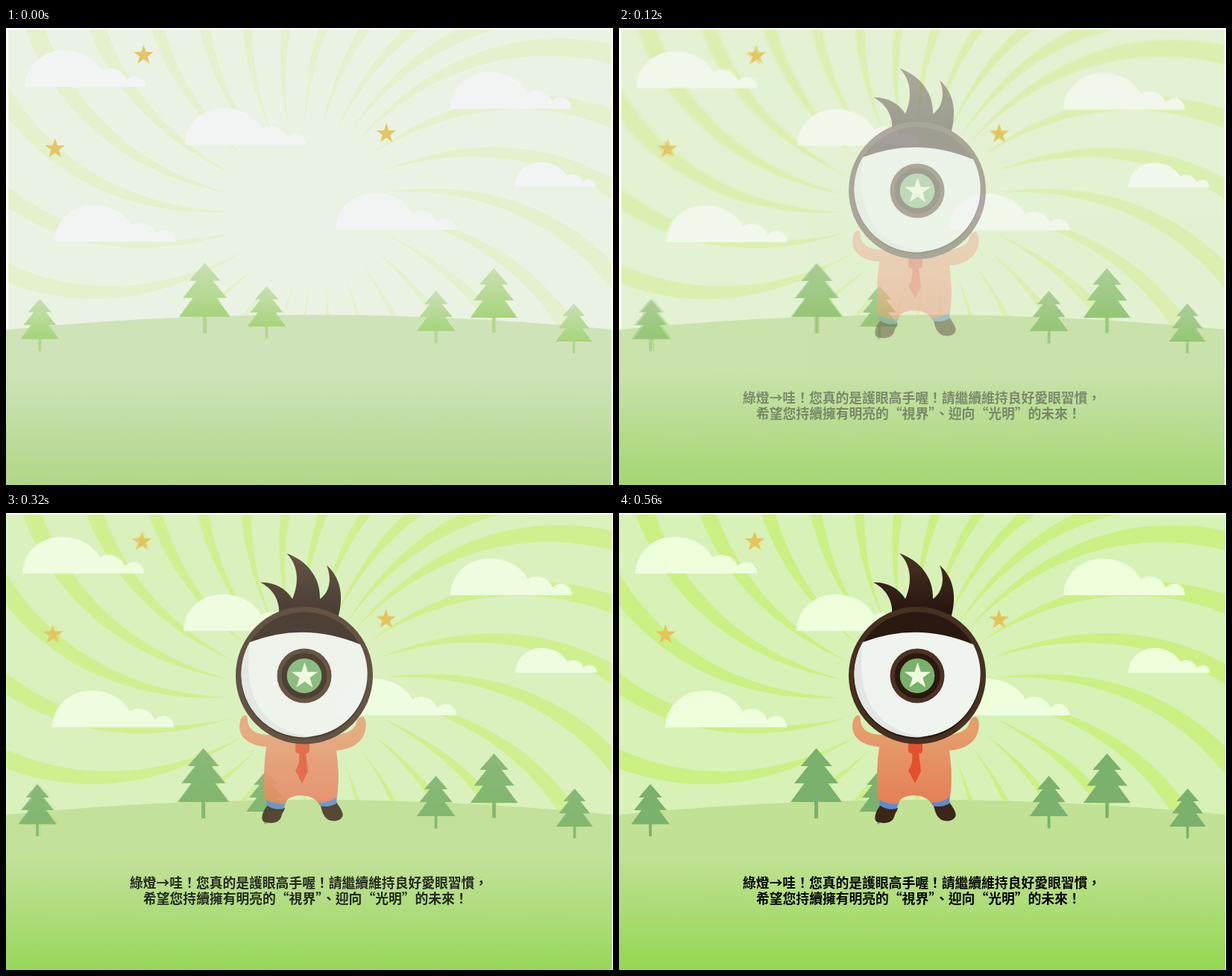
An HTML page for the animation above (800 ms loop, 814 by 612 pixels).

```html
<!DOCTYPE html>
<html lang="zh-Hant">
<head>
<meta charset="utf-8">
<style>
  html, body { margin: 0; height: 100%; overflow: hidden; background: #fff; }
  svg { display: block; width: 814px; height: 612px; }
  text { font: 900 17.8px "Noto Sans CJK TC", "Noto Sans CJK JP", sans-serif; }
</style>
</head>
<body>
<svg id="stage" viewBox="0 0 814 612"></svg>
<script>
const STEP = 40, STEPS = 14, LOOP = 800;
const INSET = 'M3 2H812V612H0V404H3Z', FULL = 'M0 2H813V612H0Z';

const pale = {
  id: 'pale', sky: '#eaf3e3', ray: '#e5f0cd', cloud: '#f2f4f4', star: '#e4c666',
  ground: ['#cfe3b9', '#b0d688'], tree: ['#cae0b4', '#a6d47b'], trunk: '#b1d88c',
  fit: 'matrix(.994 0 0 1.005 3.6 -2.2)'
};
const vivid = {
  id: 'vivid', sky: '#d7f1b6', ray: '#ccf083', cloud: '#eeffdc', star: '#e5c458',
  ground: ['#c1e194', '#93d751'], tree: ['#7ab16c', '#7ab16c'], trunk: '#7ab16c', fit: ''
};

const rayAngles = [-219, -204, -189, -176, -162.5, -148, -135, -121.8, -109, -96.8, -84.4, -73.5,
  -64.5, -56.5, -43, -28.8, -13.8, 1.5, 16.5, 30, 44, 59, 74, 86, 97, 113, 127];
const clouds = [[22, 32, 1], [238, 109, 1], [596, 61, 1], [62, 238, 1], [441, 222, 1], [683, 181, .67]];
const trees = [[42, 363, .745], [264.5, 315, 1], [348, 346, .75], [576.5, 352, .75], [654.5, 322, .92], [762.5, 369, .71]];
const stars = [[182, 38.5], [62.5, 163], [509.5, 143]];

const path = (d, fill) => `<path d="${d}" fill="${fill}"/>`;
const circle = (x, y, r, fill) => `<circle cx="${x}" cy="${y}" r="${r}" fill="${fill}"/>`;
const place = ([x, y, s = 1], body) => `<g transform="translate(${x} ${y}) scale(${s})">${body}</g>`;
const gradient = (id, [from, to], y1, y2, units = 'userSpaceOnUse') =>
  `<linearGradient id="${id}" gradientUnits="${units}" x1="0" x2="0" y1="${y1}" y2="${y2}">
   <stop stop-color="${from}"/><stop offset="1" stop-color="${to}"/></linearGradient>`;

function star(x, y, size, fill) {
  const points = Array.from({ length: 10 }, (_, i) => {
    const r = i % 2 ? size * .39 : size, a = (i * 36 - 90) * Math.PI / 180;
    return [x + r * Math.cos(a), y + r * Math.sin(a)].map(v => v.toFixed(1));
  });
  return path('M' + points.join('L') + 'Z', fill);
}

// A band that widens and turns clockwise as it leaves the centre.
function ray(angle) {
  const left = [], right = [];
  for (let r = 105; r <= 585; r += 20) {
    const turn = (angle + .0294 * r + 8.16e-5 * r * r) * Math.PI / 180;
    const half = .047 * (r - 105) / r;
    const at = a => (405 + r * Math.cos(a)).toFixed(1) + ' ' + (238 + r * Math.sin(a)).toFixed(1);
    left.push(at(turn - half));
    right.unshift(at(turn + half));
  }
  return 'M' + left.concat(right).join('L') + 'Z';
}

function landscape(c) {
  const cloud = path('M0 49C1 20 24 0 52 0C77 0 96 12 104 28C113 20 132 24 137 39C147 29 163 34 163 49Z', c.cloud);
  const tree = path('M-2.5 70H2.5V94H-2.5Z', c.trunk) +
    path('M0 0L21 24H11L29.5 47H16L34.5 72H-34.5L-16 47H-29.5L-11 24H-21Z', `url(#${c.id}Tree)`);
  return gradient(c.id + 'Ground', c.ground, 460, 612) +
    gradient(c.id + 'Tree', c.tree, 0, 1, 'objectBoundingBox') +
    path('M0 0H814V612H0Z', c.sky) +
    `<g transform="${c.fit}">` + path(rayAngles.map(ray).join(''), c.ray) +
    clouds.map(p => place(p, cloud)).join('') +
    stars.map(([x, y]) => star(x, y, 14, c.star)).join('') + '</g>' +
    path('M0 404Q412 364 814 404V612H0Z', `url(#${c.id}Ground)`) +
    `<g transform="${c.fit}">` + trees.map(p => place(p, tree)).join('') + '</g>';
}

const body =
  gradient('shirt', ['#e59e6d', '#e57f58'], 290, 390) +
  gradient('hair', ['#4a3222', '#281710'], 54, 128) +
  path('M352 390C344 398 340 412 347 414C358 417 367 414 369 407C370 402 373 399 374 395ZM422 392C424 402 428 411 436 412C446 414 454 408 451 401C449 395 445 391 443 387Z', '#3b2618') +
  path('M350 380L376 386L372 396Q360 399 349 391ZM417 386L444 378L443 389Q433 395 421 392Z', '#5a8bd3') +
  path('M349 313C330 312 314 303 313 287C313 277 317 270 321 271C325 272 323 278 325 283C328 292 338 297 352 297H442C458 296 467 290 470 281C471 276 475 272 479 273C483 276 484 285 481 294C477 308 462 317 443 318C446 340 447 360 444 380Q432 389 418 388C411 376 383 375 376 386Q373 390 371 390Q357 389 347 383C345 360 346 335 349 313Z', 'url(#shirt)') +
  path('M388 304H407V317Q407 322 402 322L405 346L397 362L388 345Q395 335 393 322Q388 322 388 317Z', '#e2512d') +
  path('M341 93C358 92 375 100 384 115C393 95 393 70 376 54C402 63 422 85 421 115C433 107 438 90 430 70C448 86 454 110 445 141L366 137C368 118 358 101 341 93Z', 'url(#hair)');

const eye =
  circle(400, 217.5, 92, '#463020') + circle(400, 217.5, 85, '#2a1910') +
  path('M327 173Q400 145 475 176A84.5 84.5 0 1 1 327 173Z', '#f0f4ee') +
  path('M327 173A84.5 84.5 0 0 0 408 300Q312 285 327 173Z', '#e3e6e3') +
  circle(400, 218, 36.5, '#4b3322') + circle(400, 218, 30.5, '#2a190f') +
  circle(400, 218, 23.3, '#79b16c') + star(400.5, 218.5, 18.5, '#eefcdd');

const caption =
  '<text x="166" y="502">綠燈→哇！您真的是護眼高手喔！請繼續維持良好愛眼習慣，</text>' +
  '<text x="184" y="523">希望您持續擁有明亮的“視界”、迎向“光明”的未來！</text>';

document.getElementById('stage').innerHTML =
  `<clipPath id="inset"><path d="${INSET}"/></clipPath><clipPath id="full"><path d="${FULL}"/></clipPath>` +
  `<g clip-path="url(#inset)">${landscape(pale)}</g>` +
  `<g id="front">${landscape(vivid)}${body}${eye}${caption}</g>`;

const front = document.getElementById('front');
function draw() {
  const step = Math.min(STEPS, Math.floor(performance.now() % LOOP / STEP));
  front.setAttribute('opacity', 1 - (1 - step / STEPS) ** 2);
  front.setAttribute('clip-path', `url(#${step < 6 ? 'inset' : 'full'})`);
  requestAnimationFrame(draw);
}
draw();
</script>
</body>
</html>
```
